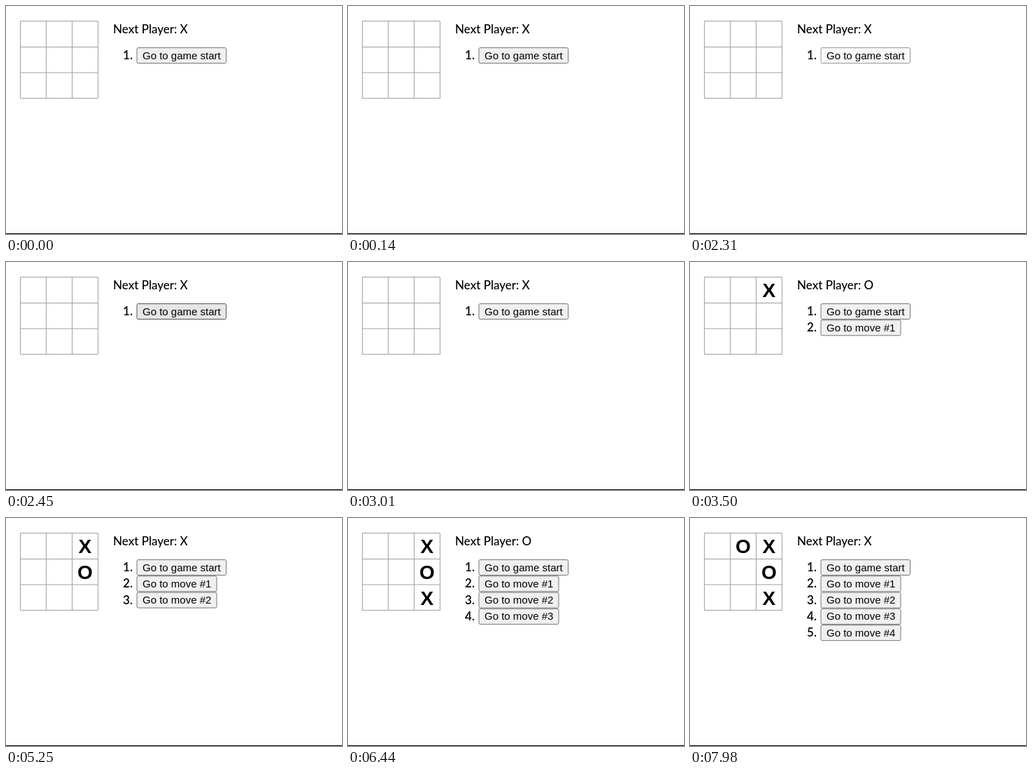
Animation of 480 by 325 pixels, one loop 8 s. Source, as an HTML page:

```html
<!DOCTYPE html>
<html lang="en">
<head>
<meta charset="utf-8">
<title>Tic-tac-toe history</title>
<style>
  html, body { margin: 0; width: 100%; height: 100%; overflow: hidden; background: #fff; }
  svg { display: block; width: 480px; height: 325px; }
  .label { font: 500 17px Lato, "Open Sans", sans-serif; }
  .number { font-weight: 600; text-anchor: end; }
  .button { font: 15px "Liberation Sans", Arial, sans-serif; }
  .mark { font: bold 28px "Liberation Sans", Arial, sans-serif; text-anchor: middle; }
  .grid { fill: none; stroke: #a0a0a0; }
  rect { fill: #f0f0f0; stroke: #777; }
  .pressed rect { fill: #f8f8f8; stroke: #999; }
  .hover rect { fill: #e6e6e6; stroke: #555; }
</style>
</head>
<body>
<svg viewBox="0 0 480 325">
  <path class="grid" d="M20.5 21.5H131.5V131.5H20.5ZM57.5 21.5V131.5M94.5 21.5V131.5M20.5 58.5H131.5M20.5 95H131.5"/>
  <text id="status" class="label" x="153" y="39"></text>
  <g id="marks"></g>
  <g id="history"></g>
  <path d="M0 324.5H480" stroke="#000"/>
</svg>
<script>
const LOOP = 8000, PRESS = 2310, RELEASE = 2450, LEAVE = 3010;
const moves = [
  { at: 3500, col: 2, row: 0 },
  { at: 5250, col: 2, row: 1 },
  { at: 6440, col: 2, row: 2 },
  { at: 7980, col: 1, row: 0 }
];
const byId = id => document.getElementById(id);
const player = i => "XO"[i % 2];

function mark({ col, row }, i) {
  return `<text class="mark" x="${39 + col * 36.9}" y="${50.3 + row * 36.8}">${player(i)}</text>`;
}

function entry(i, state) {
  const y = 59.5 + i * 23.3;
  const text = i ? `Go to move #${i}` : "Go to game start";
  return `<g class="${state}">
    <text class="label number" x="181" y="${y + 16.5}">${i + 1}.</text>
    <rect x="187" y="${y}" width="${i ? 114 : 127.5}" height="22" rx="2"/>
    <text class="button" x="195" y="${y + 16}">${text}</text></g>`;
}

let shown;
function draw(now) {
  const t = now % LOOP;
  const played = moves.filter(m => t >= m.at);
  const state = t < PRESS || t >= LEAVE ? "" : t < RELEASE ? "pressed" : "hover";
  const key = played.length + state;
  if (key !== shown) {
    shown = key;
    byId("status").textContent = "Next Player: " + player(played.length);
    byId("marks").innerHTML = played.map(mark).join("");
    byId("history").innerHTML = [0, ...played].map((_, i) => entry(i, i ? "" : state)).join("");
  }
}

const start = performance.now();
function tick() {
  draw(performance.now() - start);
  requestAnimationFrame(tick);
}
tick();
</script>
</body>
</html>
```
